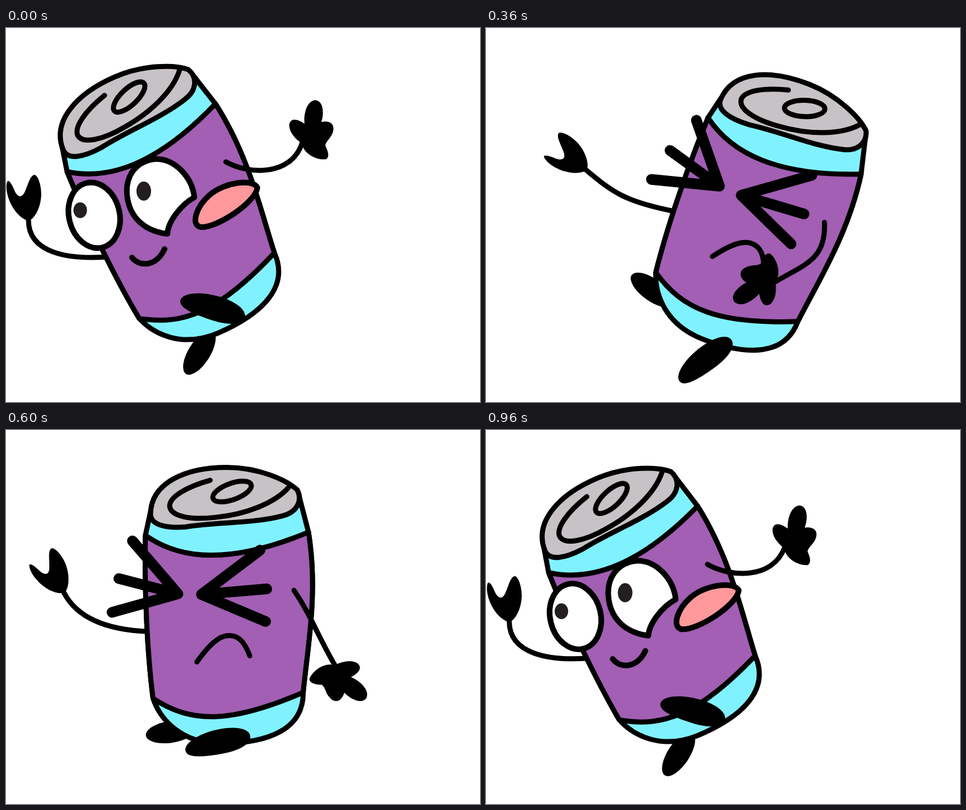
Write an HTML page that moves like this. It is 843 px wide and 665 px high and loops after 1 s.

```html
<!DOCTYPE html>
<html lang="en">
<head>
<meta charset="utf-8">
<title>Startled can</title>
<style>
  html, body { margin: 0; width: 100%; height: 100%; overflow: hidden; background: #fff; }
  svg { display: block; width: 100%; height: 100%; }
  .line { fill: none; stroke: #000; stroke-width: 9; stroke-linecap: round; stroke-linejoin: round; }
  .edge { stroke: #000; stroke-width: 9; stroke-linejoin: round; }
  .thick { stroke-width: 19; }
  .face { stroke-width: 10; }
  .cyan { fill: #80f2ff; }
  .purple { fill: #a25fb3; }
  .gray { fill: #c7c2c6; }
  .white { fill: #fff; }
  .pink { fill: #ff999b; }
  .pupil { fill: #231f20; }
</style>
</head>
<body>
<svg viewBox="0 0 843 665">
  <ellipse id="backFoot" rx="45" ry="19.5"/>
  <path id="leftArm" class="line"/>
  <path id="leftHand" d="M0,1 C-26,-6 -44,-48 -38,-68 C-35,-75 -28,-61 -24,-51 C-18,-40 -11,-40 -6,-52 C0,-66 3,-79 10,-81 C18,-81 25,-55 22,-38 C20,-20 10,-2 0,1Z"/>

  <g id="body">
    <path class="edge cyan" d="M257,145 L248,187 C246,290 252,400 262,477 C275,515 312,556 380,557 C470,557 530,530 529,466 C536,390 556,290 538,181 L521,116Z"/>
    <path class="edge purple" d="M248,187 C310,231 400,239 538,181 C556,290 536,390 529,466 C400,522 330,522 262,477 C252,400 246,290 248,187Z"/>
    <path class="edge gray" d="M257,149 C258,93 320,66 393,66 C450,66 500,89 518,106 C528,125 517,146 492,152 C440,166 375,163 320,172 C285,175 257,169 257,149Z"/>
    <path class="line" d="M363,89 C320,101 291,119 291,135 C293,154 330,160 372,155 C425,150 478,130 503,101"/>
    <ellipse class="line" transform="translate(402 109) rotate(-20)" rx="36" ry="14.5"/>
  </g>

  <g id="smile">
    <ellipse class="edge face white" transform="translate(157 333) rotate(-14)" rx="45" ry="59"/>
    <ellipse class="pupil" cx="132" cy="324" rx="12" ry="14"/>
    <path class="edge face white" d="M335,301 C331,265 300,232 266,233 C230,236 210,265 216,303 C222,340 250,362 287,366 C288,345 310,315 335,301Z"/>
    <ellipse class="pupil" cx="245" cy="290" rx="13" ry="17"/>
    <path class="edge face pink" d="M447,284 C444,310 375,356 346,354 C328,350 338,318 362,297 C390,273 440,268 447,284Z"/>
    <path class="line face" d="M224,408 C237,425 267,425 282,393"/>
  </g>

  <g id="wince">
    <path class="line thick" d="M222,196 L303,290 L198,263 M303,290 L186,323"/>
    <path class="line thick" d="M449,212 L345,291 L461,281 M345,291 L459,339"/>
    <path class="line" d="M337,411 C356,384 375,364 393,364 C411,363 422,376 431,400"/>
  </g>

  <path id="frontFoot" d="M-59,4 C-57,-11 -24,-22 8,-22 C40,-22 58,-13 59,-2 C60,13 38,22 5,22 C-30,22 -60,19 -59,4Z"/>
  <path id="rightArm" class="line"/>
  <path id="rightHand" d="M0,2 C-14,-8 -24,-20 -23,-33 C-20,-45 -8,-42 4,-34 C2,-55 10,-76 24,-76 C38,-74 39,-52 34,-37 C48,-40 58,-34 55,-21 C52,-8 42,-4 41,5 C46,15 49,24 43,29 C28,32 2,20 0,2Z"/>
</svg>
<script>
const LOOP = 1000, STEP = 40;
const RECOIL = 88, RETURN = 930;        // quick jerk away, slow swing back
const WINCE_FROM = 40, WINCE_TO = 900;

const el = id => document.getElementById(id);
const ease = u => (1 - Math.cos(Math.PI * u)) / 2;

// 0 at the far end of the recoil, 1 at rest
function restAmount(time) {
  return time < RECOIL ? 1 - ease(time / RECOIL) : ease((time - RECOIL) / RETURN);
}

function place(id, [x, y], angle, [cx, cy] = [0, 0]) {
  el(id).setAttribute('transform',
    `translate(${x} ${y}) rotate(${angle}) translate(${-cx} ${-cy})`);
}

function drawArm(side, shoulder, bend1, bend2, hand, angle) {
  el(side + 'Arm').setAttribute('d', `M${shoulder} C${bend1} ${bend2} ${hand}`);
  place(side + 'Hand', hand, angle);
}

function draw(time) {
  const p = restAmount(time), arch = Math.sin(Math.PI * p);
  const mix = (a, b, bulge = 0) => a + (b - a) * p + bulge * arch;
  // Point moving between two places along an arched path
  const arc = (a, b, [bx, by]) => [mix(a[0], b[0], bx), mix(a[1], b[1], by)];

  const tilt = mix(29.8, -26);
  const base = arc([445, 479.5], [357, 458], [1, 5]);
  place('body', base, tilt + 2.6, [395.5, 471.5]);
  place('smile', base, tilt + 26, [357, 458]);
  place('wince', arc([490, 296], [208, 324], [0, -21]), tilt + 2.6, [324, 290.5]);

  place('frontFoot', arc([397, 602], [368, 497], [-4, 14]), mix(-49, 18));
  place('backFoot', arc([311, 419], [344, 577], [-38, 27]), mix(59, -58));

  drawArm('left',
    arc([378, 312], [180, 407], [-11, -9]),
    arc([290, 286], [110, 412], [-12, -4]),
    arc([285, 280], [40, 400], [-19, -19]),
    arc([222, 237], [40, 342], [-14, -9]),
    mix(-55, 0));

  // The right hand sweeps half a turn around its shoulder.
  const shoulder = arc([642, 382], [391, 238], [16, -14]);
  const swing = mix(165, -14) * Math.PI / 180, reach = mix(123, 140, 21);
  const hand = [shoulder[0] + reach * Math.cos(swing), shoulder[1] + reach * Math.sin(swing)];
  drawArm('right', shoulder,
    arc([625, 460], [430, 260], [32, -14]),
    arc([565, 440], [507, 265], [22, 25]),
    hand, mix(282, 0));

  const wincing = time >= WINCE_FROM && time < WINCE_TO;
  el('wince').style.display = wincing ? '' : 'none';
  el('smile').style.display = wincing ? 'none' : '';
}

let start;
function tick(now) {
  start ??= now;
  const time = Math.max(0, now - start) % LOOP;
  draw(Math.floor(time / STEP) * STEP);
  requestAnimationFrame(tick);
}
draw(0);
requestAnimationFrame(tick);
</script>
</body>
</html>
```
